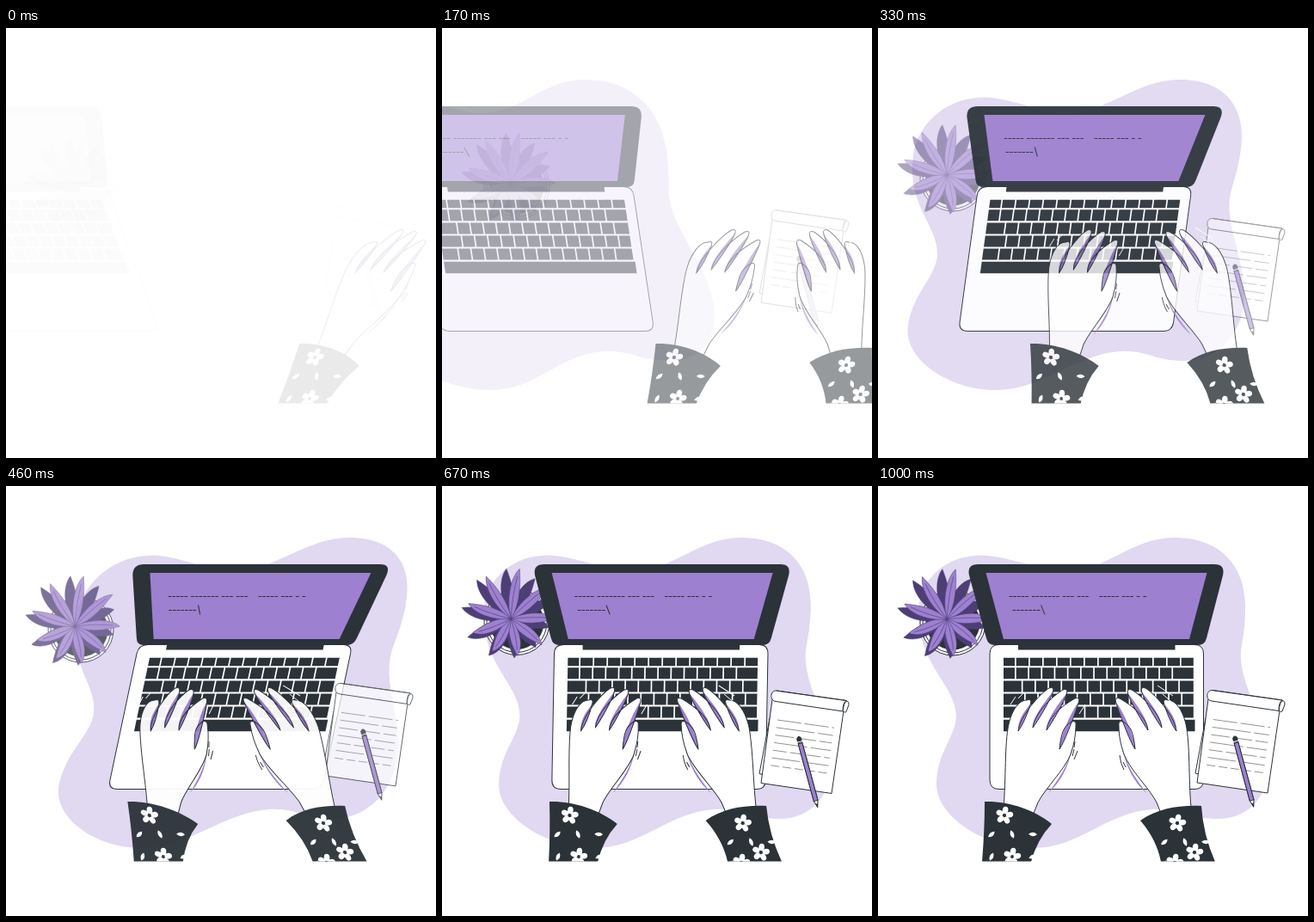
An HTML page for the animation above (1.04 s loop, 500 px wide and 500 px high).

```html
<!DOCTYPE html>
<html>
<head>
<meta charset="utf-8">
<style>
  html, body { margin: 0; width: 100%; height: 100%; overflow: hidden; background: #fff; }
  svg { display: block; width: 100%; height: 100%; }
</style>
</head>
<body>
<svg id="stage" viewBox="0 0 500 500"></svg>
<script>
const DARK = '#2b3238', PURPLE = '#9d80d0', SHADE = '#4d3f75', PALE = '#e0d9f1';
const LOOP = 1040, FPS = 24, LEAD = 34;

const path = (d, attrs = '') => `<path d="${d}" ${attrs}/>`;
const fill = (d, color) => path(d, `fill="${color}" stroke="none"`);
const line = (d, color = DARK, width = 1) => path(d, `fill="none" stroke="${color}" stroke-width="${width}"`);
const group = (id, content) => `<g id="${id}" stroke="${DARK}" stroke-linejoin="round">${content}</g>`;
const repeat = (n, make) => Array.from({ length: n }, (_, i) => make(i)).join('');

// ---- background ----
const blob = fill(`M114,81 C140,79 168,91 205,98 C262,106 290,60 345,60
  S427,95 427,140 S418,185 424,215 S455,285 455,322 S432,387 395,387
  S350,374 318,376 C262,381 235,421 180,421 S68,385 68,347
  S91,292 91,266 C89,230 47,208 47,148 C47,112 75,83 114,81Z`, PALE);

// ---- plant ----
const leaf = (angle, len, width, color) => `<g transform="translate(80 155) rotate(${angle})">` +
  path(`M0,0C${len * .35},${-width} ${len * .8},${-width} ${len},0
    C${len * .8},${width * .3} ${len * .35},${width} 0,0Z`,
    `fill="${color}" stroke="${SHADE}" stroke-width=".5"`) +
  line(`M0,0Q${len * .5},-3 ${len * .85},-1`, SHADE, .6) + '</g>';
// Leaves fan out evenly and are longest in the direction of the first one.
const fan = (count, first, len, stretch, width, color) => repeat(count, i => {
  const turn = i * 360 / count;
  return leaf(first + turn, len + stretch * Math.cos(turn * Math.PI / 180), width, color);
});
const pot = [38, 35, 31].map((r, i) =>
  `<circle cx="87" cy="159" r="${r}" fill="${i < 2 ? '#fff' : DARK}"/>`).join('');
const plant = pot + fan(10, -131, 52, 8, 11, SHADE) + fan(9, -80, 51, 8, 9, PURPLE);

// ---- laptop ----
const KEYS = { left: 146, right: 368.5, gap: 1.7 };
const key = (x, end, y, h) => `M${x},${y}H${end - KEYS.gap}v${h}H${x}Z`;
// Thirteen keys of one width after the first one; the last key fills the row.
function keyRow(first, row) {
  const short = row ? 0 : 3.5, y = 196.2 + 15.1 * row + short, pitch = row ? 15.2 : 16;
  const edge = i => i ? KEYS.left + first + pitch * (i - 1) : KEYS.left;
  return repeat(14, i => key(edge(i), i < 13 ? edge(i + 1) : KEYS.right, y, 13 - short));
}
const keyboard = [14.7, 14.7, 22.5, 25.7, 19.3].map(keyRow).join('') +
  key(KEYS.left, KEYS.right + KEYS.gap, 271.7, 13.5);

const dashes = (x, y, text) => [...text].map(c => {
  const d = c === '-' ? `M${x},${y}h3.7` : '';
  x += d ? 4.7 : 2.9;
  return d;
}).join('');
const laptop =
  path('M141,184.5H368Q378.5,184.5 378.5,195V342Q378.5,352.5 368,352.5H141Q130,352.5 130,342V195Q130,184.5 141,184.5Z', 'fill="#fff"') +
  fill('M117,91H391Q404,91 401,104L382,177Q380,185 372,185H136Q128,185 126,177L106,104Q103,91 117,91Z', DARK) +
  fill('M125.5,101H382.5L362,178H146Z', PURPLE) +
  fill('M163,184H345.5V190.5H163Z', DARK) + fill(keyboard, DARK) +
  line(dashes(152.5, 128.5, '----- ------- --- ---    ----- --- - -') +
    dashes(156.5, 144.5, '-------') + 'M189.5,138.5L194,149.5');

// ---- notepad and pencil ----
const notes = repeat(7, i => path(`M${390 - 1.3 * i},${271.5 + 8.8 * i}l66,9.2`,
  `fill="none" stroke="#777" stroke-width=".8" stroke-dasharray="${10 + (i * 17 + 18) % 40} 4"`));
const pencil = `<g transform="translate(415 293) rotate(-15.2)">` +
  path('M-2.4,5H2.4V75L0,83L-2.4,75Z', 'fill="#fff"') +
  path('M-2.4,6V75H2.4V6Z', `fill="${PURPLE}"`) +
  path('M-2.4,3V0Q0,-4 2.4,0V3Z', `fill="${DARK}"`) +
  fill('M-1.4,79H1.4L0,84Z', DARK) + '</g>';
const pad =
  path('M381,270L369,334L400,342Z', 'fill="#fff"') +
  path('M384,248L371,345L453,357L467,261Z', 'fill="#fff"') +
  path('M389,237.5C381,237 381,249.5 388,250L466,261.5Q466,251 470,249Z', 'fill="#fff"') +
  path('M389,237.5L470,249Q474,250.5 473,254L470,262Q467,264 466.5,260Q467,251 471,249.5', 'fill="#fff"') +
  notes + pencil;

// ---- hands ----
// Fingertips from little finger to index, and the valley after each finger.
const TIPS = [[177, 249], [203, 235], [219, 237], [233, 247], [229, 274]];
const VALLEYS = [[163, 285], [180, 281], [196, 284], [211, 306]];
const curve = (a, ax, ay, b, bx, by) => `C${a[0] + ax},${a[1] + ay} ${b[0] + bx},${b[1] + by} ${b}`;

function hand() {
  let outline = 'M146,374C149,340 147,300 152,277C156,260 164,249 173,249', shade = '';
  VALLEYS.forEach((valley, i) => {
    const [x, y] = TIPS[i], side = [x + .5, y + 4], next = TIPS[i + 1];
    const down = curve(side, -3, 10, valley, 6, -8);
    outline += `Q${x + 2},${y - 2} ${side}` + down + curve(valley, 2, -18, [next[0] - 4, next[1]], -10, 6);
    shade += `M${side}` + down + curve(valley, -1, -11, side, -9, 11) + 'Z';
  });
  outline += 'Q231,272 230,279C230,290 228,300 224,312C217,330 194,352 186,368L178,388';
  return fill(outline, '#fff') + fill(shade, PURPLE) +
    fill('M226,302C222,325 210,340 198,357C209,347 222,330 226,302Z', PURPLE) + line(outline);
}
const flower = (x, y) => `<g transform="translate(${x} ${y})" fill="#fff" stroke="none">` +
  repeat(5, i => `<ellipse cy="-6" rx="3.3" ry="4.3" transform="rotate(${i * 72 + 10})"/>`) +
  `<circle r="1.9" fill="${DARK}"/></g>`;
// Two rows of small leaves below the first flower.
const sprigs = (x, y) => repeat(6, i => path('M-5,0Q0,-4.5 5,0Q0,4.5 -5,0Z', `fill="#fff" stroke="none"
  transform="translate(${x - 15 + 24 * (i % 3)} ${y + 22 + 26 * (i / 3 | 0)}) rotate(${i * 112 % 180 - 42})"`));
const cuff = (shape, ...flowers) => `<g clip-path="url(#hem)">` + fill(shape, DARK) +
  sprigs(...flowers[0]) + flowers.map(f => flower(...f)).join('') + '</g>';

const hands = hand() + `<g transform="translate(510 0) scale(-1 1)">${hand()}</g>` +
  cuff('M124,367C150,366 182,376 202,393Q185,411 178,437H121Q124,400 124,367Z', [147, 383], [156, 431]) +
  cuff('M305,389C325,375 350,371 376,372Q378,405 392,437H329Q324,411 305,389Z', [348, 392], [368, 426], [345, 438]) +
  line('M229,297L228,304M228,306L226,314M232,308L228,318M281,313Q282,323 286,330M285,321L288,327') +
  line('M154,254L160,245M163,247L170,240M234,265L241,254M325,232L343,244M331,242L340,250', '#fff');

document.getElementById('stage').innerHTML =
  '<clipPath id="hem"><rect x="-100" y="300" width="800" height="136.5"/></clipPath>' +
  group('blob', blob) + group('plant', plant) + group('laptop', laptop) + group('pad', pad) + group('hands', hands);

// ---- motion ----
function bezier(x1, y1, x2, y2) {
  const at = (u, a, b) => 3 * (1 - u) ** 2 * u * a + 3 * (1 - u) * u * u * b + u ** 3;
  return x => {
    let lo = 0, hi = 1;
    for (let i = 0; i < 30; i++) {
      const mid = (lo + hi) / 2;
      if (at(mid, x1, x2) < x) lo = mid; else hi = mid;
    }
    return at(lo, y1, y2);
  };
}
const overshoot = bezier(.36, -.01, .5, 1.38), easeOut = bezier(0, 0, .58, 1);
const STOPS = [0, .6, .8, 1], SLOPES = [20, -10, 2, 0].map(deg => Math.tan(deg * Math.PI / 180));

function pose(id, opacity, slope, x, y) {
  const el = document.getElementById(id);
  el.setAttribute('opacity', Math.max(0, Math.min(1, opacity)));
  el.setAttribute('transform', `matrix(1 0 ${slope} 1 ${x} ${y})`);
}
// Fast skewed entrance; side is -1 from the left, 1 from the right.
function rush(id, t, side, centerY, ease) {
  const i = t < .6 ? 0 : t < .8 ? 1 : 2;
  const p = ease((t - STOPS[i]) / (STOPS[i + 1] - STOPS[i]));
  const slope = -side * (SLOPES[i] + (SLOPES[i + 1] - SLOPES[i]) * p);
  const x = i ? 0 : side * 250 * (1 - p);
  pose(id, i ? 1 : p, slope, x - slope * centerY, 0);
}
function slide(id, t, from) {
  const p = overshoot(t);
  pose(id, p, 0, 0, from * (1 - p));
}
// The picture advances in whole steps, 24 per second.
function draw(now) {
  const step = Math.min(FPS, Math.floor((now % LOOP + 5) * FPS / 1000));
  const t = Math.min(1, step / FPS + LEAD / 1000);
  rush('blob', t, -1, 240, overshoot);
  rush('laptop', t, -1, 222, overshoot);
  rush('hands', t, 1, 336, easeOut);
  slide('plant', t, 30);
  slide('pad', t, -30);
}
const start = performance.now();
function tick() {
  draw(performance.now() - start);
  requestAnimationFrame(tick);
}
tick();
</script>
</body>
</html>
```
